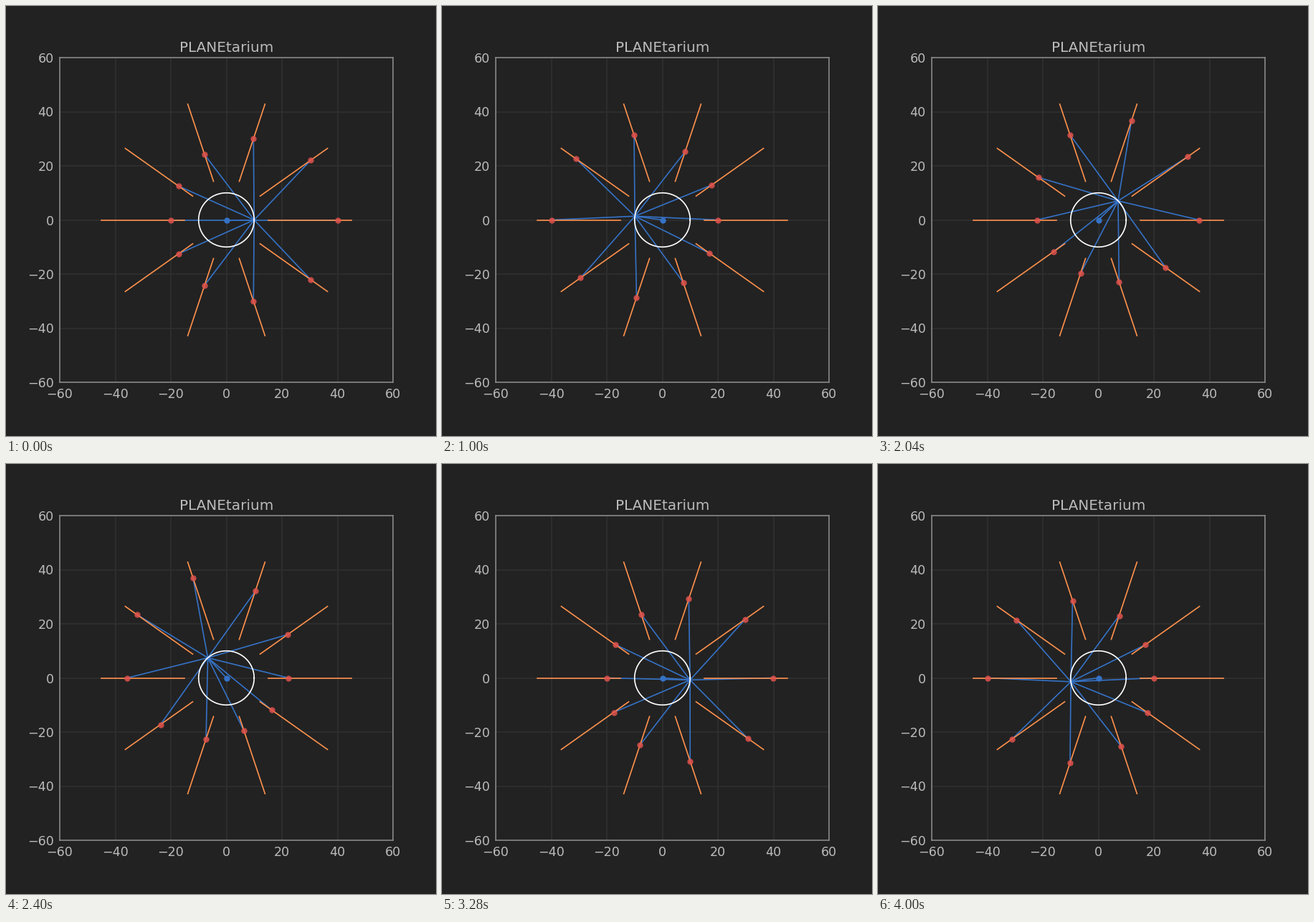
Animation, 600 px wide and 600 px high, one loop 4.04 s. Source, as a matplotlib script:

```python
import numpy as np
import matplotlib.pyplot as plt
from matplotlib.animation import FuncAnimation

CRANK, ROD = 10, 30
INNER, OUTER = 15, 45
FRAMES, INTERVAL = 101, 40

BACK, GRID, EDGE, TEXT = "#222222", "#2f2f2f", "#888888", "#bbbbbb"
BLUE, RED, ORANGE = "#3572c6", "#c44e52", "#ff914d"

plt.rcParams.update({"font.family": "DejaVu Sans", "text.color": TEXT})

fig = plt.figure(figsize=(6, 6), dpi=100, facecolor=BACK)
ax = fig.add_axes([0.125, 0.125, 0.775, 0.755], facecolor=BACK)
ax.set(xlim=(-60, 60), ylim=(-60, 60))
ax.set_title("PLANEtarium", fontsize=14.4, pad=6)
ax.set_axisbelow(True)
ax.grid(color=GRID, lw=1.3)
ax.tick_params(length=0, pad=6, labelsize=12.6, labelcolor=TEXT)
for spine in ax.spines.values():
    spine.set(color=EDGE, linewidth=1.2)

angles = np.arange(10) * np.pi / 5
axes_xy = np.column_stack([np.cos(angles), np.sin(angles)])

rods = [ax.plot([], [], color=BLUE, lw=1.2)[0] for _ in angles]
arm, = ax.plot([], [], color=BLUE, lw=1.2)
for x, y in axes_xy:
    ax.plot([INNER * x, OUTER * x], [INNER * y, OUTER * y],
            color=ORANGE, lw=1.2)

turn = np.linspace(0, 2 * np.pi, 200)
ax.plot(CRANK * np.cos(turn), CRANK * np.sin(turn), color="white", lw=1.2)
ax.plot(0, 0, "o", color=BLUE, ms=6, mew=0)
pistons, = ax.plot([], [], "o", color="#e0524d", ms=6, mew=0, alpha=0.85)


def update(frame):
    theta = (frame / 10) ** 1.2
    pin = CRANK * np.array([np.cos(theta), np.sin(theta)])
    rel = theta - angles
    reach = CRANK * np.cos(rel) + np.sqrt(ROD**2 - (CRANK * np.sin(rel))**2)
    heads = reach[:, None] * axes_xy
    for rod, head in zip(rods, heads):
        rod.set_data(*zip(pin, head))
    arm.set_data(*zip((0, 0), pin))
    pistons.set_data(*heads.T)
    return [*rods, arm, pistons]


anim = FuncAnimation(fig, update, frames=FRAMES, interval=INTERVAL,
                     repeat=True, repeat_delay=0)
plt.show()
```
